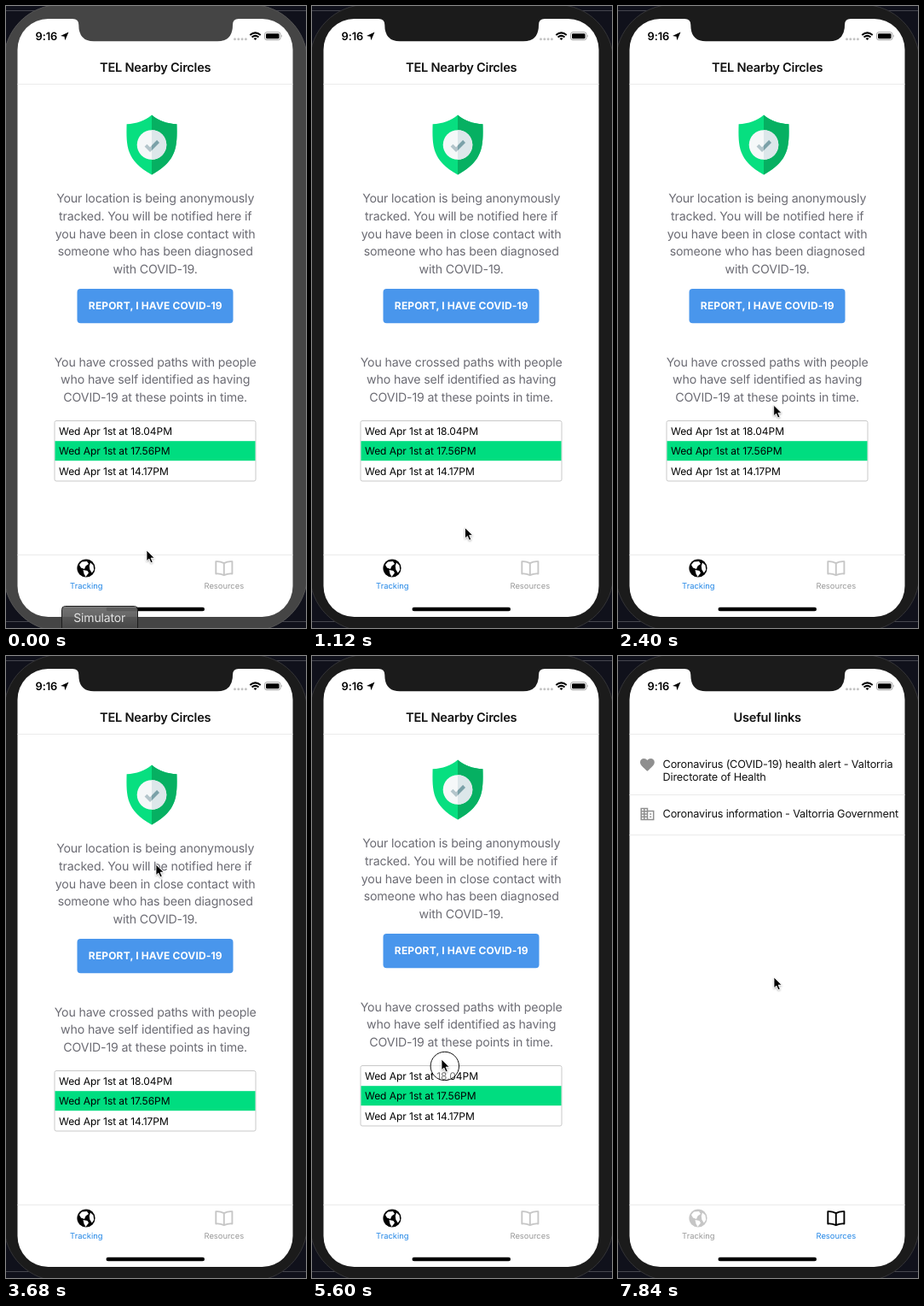
Write an HTML page that moves like this. It is 352 px wide and 728 px high and loops after 8000 ms.

```html
<!DOCTYPE html>
<html lang="en">
<head>
<meta charset="utf-8">
<title>Contact tracing app</title>
<style>
  html, body { margin: 0; width: 100%; height: 100%; overflow: hidden; background: #10111b; }
  svg { display: block; width: 100vw; height: 100vh; }
  text { font-family: Inter, "Open Sans", sans-serif; text-rendering: geometricPrecision; }
  .mid { text-anchor: middle; }
  .title { font-size: 14.6px; font-weight: 600; letter-spacing: -.25px; fill: #111; }
  .para { font-size: 14.2px; letter-spacing: -.16px; fill: #6b6b73; }
  .button { font-size: 12px; font-weight: 700; letter-spacing: .14px; fill: #fff; }
  .row { font-size: 12px; letter-spacing: -.05px; fill: #000; }
  .link { font-size: 12.7px; letter-spacing: -.18px; fill: #111; }
  .clock { font-size: 12.9px; font-weight: 600; letter-spacing: -.1px; }
  .tip { font-size: 14px; letter-spacing: -.15px; fill: #e4e4e4; }
  .rule { stroke: #ebebeb; }
  .tab text { font-size: 9.4px; fill: #999; }
  .tab { color: #c6c6c6; }
  .tab.on { color: #000; }
  .tab.on text { fill: #2286e6; }
  #bezel { fill: #1b1b1b; stroke: #343437; }
  #notch { fill: #1b1b1b; }
  .pale #bezel { fill: #454545; stroke: #555; }
  .pale #notch { fill: #454545; }
</style>
</head>
<body>
<svg id="stage" viewBox="0 0 352 728" preserveAspectRatio="none">
  <defs>
    <clipPath id="screen"><rect x="13.5" y="15" width="323" height="700" rx="36"/></clipPath>
    <clipPath id="right"><rect x="171" y="120" width="40" height="90"/></clipPath>
    <path id="crest" d="M171 127.5C163 134.5 153 137.5 141.6 138.3C141 164 141 181 171 197.5C201 181 201 164 200.4 138.3C189 137.5 179 134.5 171 127.5Z"/>
    <path id="check" d="M164 163.2L169 168.2L178.5 158.5" fill="none" stroke-width="4"/>
    <linearGradient id="glass" x2="0" y2="1">
      <stop stop-color="#686868"/>
      <stop offset=".8" stop-color="#454545"/>
    </linearGradient>
    <filter id="soft" x="-50%" y="-50%" width="200%" height="200%">
      <feDropShadow dx="0" dy="1" stdDeviation="1" flood-opacity=".35"/>
    </filter>
  </defs>

  <rect width="352" height="728" fill="#10111b"/>
  <path d="M0 5.5H352M0 720.5H352" stroke="#45464e"/>
  <rect id="bezel" x="-2.5" y="-1.5" width="356" height="733" rx="66"/>

  <g clip-path="url(#screen)">
    <rect x="13" y="15" width="324" height="700" fill="#fff"/>

    <g id="tracking">
      <g id="scroll">
        <g id="shield">
          <use href="#crest" fill="#07df80"/>
          <use href="#crest" fill="#06b062" clip-path="url(#right)"/>
          <circle cx="171" cy="162.5" r="17.3" fill="#f5f8f9"/>
          <circle cx="171" cy="162.5" r="17.3" fill="#dce7ea" clip-path="url(#right)"/>
          <use href="#check" stroke="#b3c5cb"/>
          <use href="#check" stroke="#7ba1a8" clip-path="url(#right)"/>
        </g>
        <g id="intro"></g>
        <rect x="83.5" y="331" width="183" height="40.3" rx="4" fill="#4996ec"/>
        <text class="button mid" x="175.3" y="355.4">REPORT, I HAVE COVID-19</text>
        <g id="history">
          <g id="crossed"></g>
          <rect x="57" y="485.5" width="236" height="70.5" rx="2" fill="#fff" stroke="#c9c9c9"/>
          <rect x="57.5" y="509.2" width="235" height="23" fill="#00dd80"/>
          <g id="rows"></g>
        </g>
      </g>
      <text class="title mid" x="175.2" y="77.4">TEL Nearby Circles</text>
    </g>

    <g id="resources">
      <text class="title mid" x="175.2" y="77.4">Useful links</text>
      <path class="rule" d="M13 162.5H337M13 209.5H337"/>
      <path fill="#8f8f8f" d="M34.4 134.8L32.8 133.4C28 129 26 127.2 26 124.3C26 121.8 27.9 120 30.4 120C32 120 33.5 120.7 34.4 122C35.3 120.7 36.8 120 38.4 120C40.9 120 42.8 121.8 42.8 124.3C42.8 127.2 40.8 129 36 133.4Z"/>
      <path fill="none" stroke="#8f8f8f" stroke-width="1.5" d="M27.2 178.5H34.5V191.5H27.2ZM34.5 181.5H41.7V191.5H34.5M27 181.7H34M27 185H34M27 188.2H34M30.8 178V191M37.2 185H39.2M37.2 188.2H39.2"/>
      <text class="link" x="52.6" y="130.6">Coronavirus (COVID-19) health alert - Valtorria</text>
      <text class="link" x="52.6" y="146.3">Directorate of Health</text>
      <text class="link" x="52.6" y="188.8">Coronavirus information - Valtorria Government</text>
    </g>

    <path class="rule" d="M13 91.5H337M13 642.5H337"/>

    <g class="tab" id="tabTrack">
      <circle cx="94" cy="658" r="10.6" fill="currentColor"/>
      <path fill="#fff" d="M86 654L89 650.5L95 650L97 653L93.5 655.5L92 659L88 657.5ZM90.5 660L95.5 661L97 663.5L93.5 668L91.5 664.5ZM99 651.5L102.5 654.5L103.2 660L100.8 663.5L98.3 659.5L97.8 655.5Z"/>
      <text class="mid" x="94.3" y="682">Tracking</text>
    </g>
    <g class="tab" id="tabRes">
      <path fill="none" stroke="currentColor" stroke-width="1.9" stroke-linejoin="round" d="M255.8 652.2Q251 649.6 246.3 650.2V664.5Q251 664 255.8 666.2Q260.6 664 265.4 664.5V650.2Q260.6 649.6 255.8 652.2V666.2"/>
      <text class="mid" x="255.8" y="682">Resources</text>
    </g>

    <text class="clock" x="34.5" y="39.8">9:16</text>
    <path d="M73.5 30.5L64 35L68.5 35.7L69.3 40.3Z"/>
    <path d="M268.5 38.8H282" stroke="#c4c4c4" stroke-width="3" stroke-linecap="round" stroke-dasharray="0 4.3"/>
    <g fill="none" stroke="#000" stroke-width="2">
      <path d="M286.3 34Q292.5 28.8 298.7 34M288.5 36.5Q292.5 33.2 296.5 36.5"/>
      <path d="M292.5 40L290.5 38Q292.5 36.6 294.5 38Z" fill="#000" stroke="none"/>
    </g>
    <rect x="303.5" y="30.7" width="18.5" height="9" rx="2.5" fill="none" stroke="#999" stroke-width=".9"/>
    <rect x="305" y="32.2" width="15.5" height="6" rx="1.2"/>
    <path d="M323.2 33.6Q324.8 35.2 323.2 36.8Z" fill="#999"/>
    <rect x="117.5" y="703.7" width="115.5" height="4.6" rx="2.3"/>
  </g>
  <path id="notch" d="M78 14H273V15Q266 15 266 22Q266 41.3 248 41.3H103Q85.3 41.3 85.3 22Q85.3 15 78 15Z"/>

  <g id="tip">
    <rect x="65.5" y="702.5" width="89" height="34" rx="4" fill="url(#glass)" fill-opacity=".92" stroke="#1c1c1c"/>
    <path d="M67 703.5H153" stroke="#8a8a8a" stroke-opacity=".6"/>
    <text class="tip mid" x="109.7" y="720.5">Simulator</text>
  </g>

  <g id="pointer">
    <circle id="touch" cx="3.8" cy="8" r="16.7" fill="#fff" fill-opacity=".45" stroke="#111"/>
    <path filter="url(#soft)" stroke="#fff" stroke-width=".8" d="M0 0V12.6L2.9 10L5 14.8L7.2 13.8L5.1 9.1H9.2Z"/>
  </g>
</svg>

<script>
  const LOOP = 8000, STEP = 160;
  const $ = id => document.getElementById(id);

  function addLines(id, lines, cls, x, y, gap) {
    lines.forEach((line, i) => {
      const el = document.createElementNS('http://www.w3.org/2000/svg', 'text');
      el.setAttribute('class', cls);
      el.setAttribute('x', x);
      el.setAttribute('y', y + i * gap);
      el.textContent = line;
      $(id).append(el);
    });
  }

  addLines('intro', [
    'Your location is being anonymously',
    'tracked. You will be notified here if',
    'you have been in close contact with',
    'someone who has been diagnosed',
    'with COVID-19.'
  ], 'para mid', 175.2, 230.2, 20.67);
  addLines('crossed', [
    'You have crossed paths with people',
    'who have self identified as having',
    'COVID-19 at these points in time.'
  ], 'para mid', 175.2, 421.6, 20.67);
  addLines('rows', ['18.04', '17.56', '14.17'].map(h => `Wed Apr 1st at ${h}PM`),
    'row', 62, 501.8, 23.4);

  // time, x, y
  const path = [
    [0, 165, 637], [480, 165, 637], [800, 171, 625], [1440, 188, 596],
    [1760, 188, 596], [1920, 187, 594], [2080, 187, 594], [3200, 172, 150],
    [3360, 172, 170], [3680, 176, 244], [4320, 150, 378], [4960, 152, 482],
    [5280, 152, 484], [5600, 152, 472], [5760, 152, 472], [6560, 255, 665],
    [7360, 255, 665], [7840, 183, 376], [8000, 183, 376]
  ];
  // time, vertical offset
  const pull = [[0, 0], [5280, 0], [5600, -6], [5920, 0], [8000, 0]];

  function sample(keys, t, k) {
    const i = keys.findIndex(key => key[0] > t);
    const a = keys[i - 1], b = keys[i];
    return a[k] + (b[k] - a[k]) * (t - a[0]) / (b[0] - a[0]);
  }

  const show = (id, on) => $(id).style.display = on ? '' : 'none';
  const move = (id, x, y) => $(id).setAttribute('transform', `translate(${x} ${y})`);

  function draw(t) {
    const links = t >= 7360;
    const loading = t >= 1280 && t < 1600;
    $('stage').classList.toggle('pale', t < 640);
    $('tip').style.opacity = Math.max(0, 1 - t / 320);
    show('tracking', !links);
    show('resources', links);
    show('shield', !loading);
    show('history', !loading);
    $('tabTrack').classList.toggle('on', !links);
    $('tabRes').classList.toggle('on', links);
    show('touch', t >= 5280 && t < 5760);
    move('scroll', 0, sample(pull, t, 1));
    move('pointer', sample(path, t, 1), sample(path, t, 2));
  }

  function tick() {
    draw(Math.floor(performance.now() % LOOP / STEP) * STEP);
    requestAnimationFrame(tick);
  }
  tick();
</script>
</body>
</html>
```
